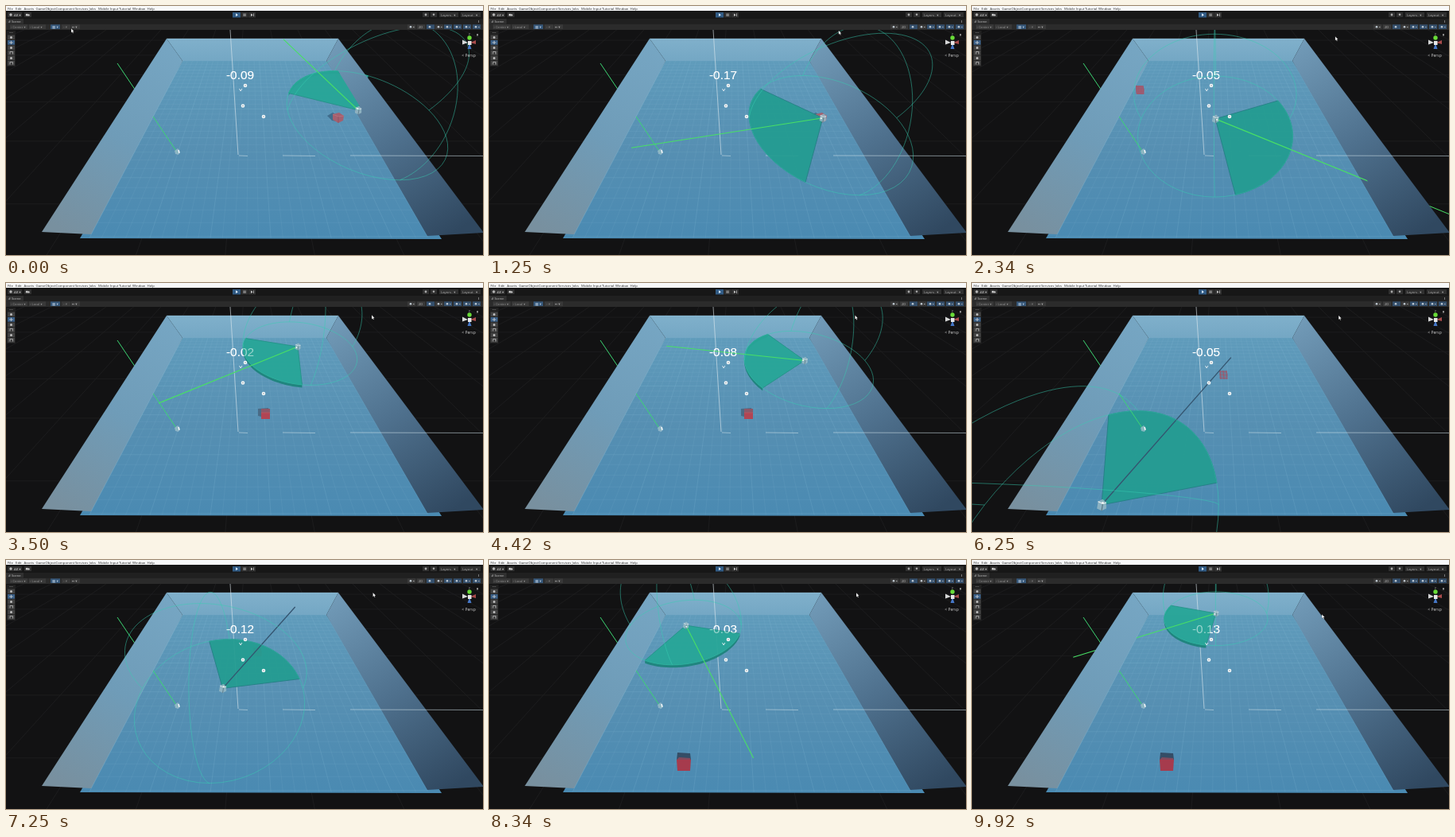
An HTML page with a canvas that plays this animation: 600 px wide and 313 px high, repeating every 10 s.

```html
<!DOCTYPE html>
<html lang="en">
<head>
<meta charset="utf-8">
<title>Scene view</title>
<style>
html, body { margin: 0; width: 100%; height: 100%; overflow: hidden; background: #111; }
canvas { display: block; width: 600px; height: 313px; }
</style>
</head>
<body>
<canvas id="stage" width="600" height="313"></canvas>
<script>
const ctx = document.getElementById('stage').getContext('2d');
const LOOP = 10000, STEP = 1000 / 12, DEG = Math.PI / 180;
const HALF_VIEW = 50 * DEG, RAY = 2.45;
const SANS = '"Liberation Sans", Arial, sans-serif';
const UI = '"Open Sans", "Noto Sans", sans-serif';

// Perspective: x across, z depth, y height; one unit is the sensing radius.
function project(x, z, y = 0) {
  const d = z - 1.4 * y;
  return d < 0.2 ? null : [308 + 318 * x / d, (808 - 546 * y) / d - 95];
}
function unproject(sx, sy) {
  const z = 808 / (sy + 95);
  return [(sx - 308) * z / 318, z];
}

// Each run: start time, cube on screen, keys [time, screen x, screen y, heading].
const runs = [
  { start: -1385, cube: [417, 140], look: 'hex',
    keys: [[0, 443, 131, 108], [700, 425, 142, 150], [1570, 417, 140, 215]] },
  { start: 1570, cube: [211, 105], look: 'mesh',
    keys: [[1570, 322, 128, 20], [2340, 306, 142, -29], [3190, 216, 108, -190]] },
  { start: 3190, cube: [326, 164], look: 'side',
    keys: [[3190, 362, 84, 228], [3500, 367, 80, 213], [5340, 434, 119, 126], [5480, 436, 122, 122]] },
  { start: 5480, cube: [316, 115], look: 'wire',
    keys: [[5480, 163, 279, 85], [6250, 163, 279, 60], [7880, 312, 119, 58]] },
  { start: 7880, cube: [245, 255], look: 'top',
    keys: [[7880, 215, 90, -40], [8340, 248, 82, -65], [9920, 307, 67, -149], [10000, 310, 67, -153]] }
];
const cursorKeys = [[0, 83, 30], [500, 180, 12], [1200, 440, 32], [2340, 458, 40],
  [3500, 461, 42], [8340, 463, 43], [9200, 460, 46], [9920, 441, 70], [10000, 440, 70]];

function sample(keys, t) {
  let i = 0;
  while (i < keys.length - 2 && t >= keys[i + 1][0]) i++;
  const a = keys[i], b = keys[i + 1];
  const k = Math.min(1, Math.max(0, (t - a[0]) / (b[0] - a[0])));
  return a.slice(1).map((v, j) => v + (b[j + 1] - v) * k);
}
for (const run of runs)
  run.path = run.keys.map(([t, x, y, h]) => [t, ...unproject(x, y), h * DEG]);

function trace(points, close) {
  ctx.beginPath();
  let pen = false;
  for (const p of points) {
    if (!p) { pen = false; continue; }
    pen ? ctx.lineTo(p[0], p[1]) : ctx.moveTo(p[0], p[1]);
    pen = true;
  }
  if (close) ctx.closePath();
}
function line(points, color, width = 1) {
  trace(points);
  ctx.strokeStyle = color;
  ctx.lineWidth = width;
  ctx.stroke();
}
function poly(points, fill) {
  trace(points, true);
  ctx.fillStyle = fill;
  ctx.fill();
}
function rect(x, y, w, h, fill) {
  ctx.fillStyle = fill;
  ctx.fillRect(x, y, w, h);
}
function disc(x, y, r, fill) {
  ctx.beginPath();
  ctx.arc(x, y, r, 0, 2 * Math.PI);
  ctx.fillStyle = fill;
  ctx.fill();
}
function text(s, x, y, size, fill, align = 'left', font = UI) {
  ctx.font = `${size}px ${font}`;
  ctx.textAlign = align;
  ctx.fillStyle = fill;
  ctx.fillText(s, x, y);
}
function gradient(x0, y0, x1, y1, ...colors) {
  const g = ctx.createLinearGradient(x0, y0, x1, y1);
  colors.forEach((c, i) => g.addColorStop(i / (colors.length - 1), c));
  return g;
}
function arc(from, to, place, steps = 64) {
  return Array.from({ length: steps + 1 }, (_, i) => {
    const a = from + (to - from) * i / steps;
    return place(Math.cos(a), Math.sin(a));
  });
}

function drawGround() {
  rect(0, 30, 600, 283, '#121213');
  for (let i = -9; i <= 9; i++)
    line([project(i * 0.7 - 0.2, 1.4), project(i * 0.7 - 0.2, 6.6)], '#222223', 0.7);
  for (let i = 0; i < 8; i++) {
    const y = 808 / (1.65 + i * 0.7) - 95;
    line([[0, y], [600, y]], '#202021', 0.7);
  }
}

function drawRoom() {
  poly([[222, 69], [403, 69], [548, 293], [93, 292]], gradient(0, 69, 0, 293, '#5f9bbb', '#568fb2', '#4a8ab2'));
  for (let i = 0; i <= 28; i++) {
    const x = -1.335 + i * 0.1;
    line([project(x, 4.92), project(x, 2.09)], i % 5 ? 'rgba(150,200,222,.13)' : 'rgba(150,200,222,.23)', 0.7);
  }
  for (let i = 0; i <= 28; i++) {
    const z = 2.1 + i * 0.1;
    line([project(-1.335, z), project(1.47, z)], i % 5 ? 'rgba(150,200,222,.13)' : 'rgba(150,200,222,.23)', 0.7);
  }
  poly([[202, 41], [418, 41], [403, 69], [222, 69]], gradient(0, 41, 0, 69, '#80b0cb', '#74a7c4'));
  poly([[202, 41], [222, 69], [107, 287], [45, 284]], gradient(210, 45, 75, 285, '#76a6c3', '#6f9cb8', '#78909f'));
  poly([[418, 41], [601, 285], [530, 289], [403, 69]], gradient(410, 50, 560, 287, '#719ab7', '#4f718e', '#304860'));
  line([[202, 41], [418, 41]], 'rgba(160,205,225,.5)', 0.6);
  line([[222, 69], [107, 287]], 'rgba(155,195,215,.35)', 0.6);
}

function drawAxes() {
  line([[282, 30], [292, 187]], 'rgba(225,235,240,.75)', 0.8);
  for (const [a, b] of [[293, 304], [348, 389], [433, 600]])
    line([[a, 188], [b, 188.5]], 'rgba(205,222,230,.7)', 0.8);
}

function drawCube([x, y], look) {
  ctx.save();
  ctx.translate(x, y);
  if (look === 'hex') {
    poly([[-13, -2], [-6, -6], [1, -2], [0, 5], [-7, 4]], 'rgba(55,95,125,.75)');
    poly([[-6, -4], [2, -6], [8, -2], [7, 4], [1, 7], [-6, 3]], '#a4606f');
    line([[-6, -4], [1, -1], [8, -2]], '#bd7480', 0.7);
    line([[1, -1], [1, 7]], '#8c4e60', 0.7);
  } else if (look === 'mesh' || look === 'wire') {
    const fill = look === 'mesh' ? '#8c7088' : '#687e99';
    poly([[-5, -5], [4, -5], [6, 0], [5, 6], [-4, 6], [-5, 1]], fill);
    for (let i = -4; i <= 4; i += look === 'mesh' ? 2 : 4) {
      line([[i, -5], [i + 1, 6]], '#a94f62', 0.8);
      line([[-5, i], [5, i + 1]], '#a94f62', 0.6);
    }
  } else if (look === 'side') {
    poly([[-9, -6], [4, -7], [5, -3], [-5, 4], [-9, 3]], '#496b86');
    rect(-5, -6, 11, 6, '#8d5667');
    rect(-5, -1, 11, 8, '#b14554');
    line([[-5, -1], [6, -1]], '#c35b66', 0.6);
  } else {
    poly([[-8, -13], [8, -12], [9, -4], [-9, -4]], '#344d66');
    poly([[-9, -4], [-6, -7], [8, -6], [9, -3]], '#81495c');
    poly([[-9, -4], [9, -4], [8, 10], [-8, 10]], '#a63b4d');
  }
  ctx.restore();
}

function drawWedge(x, z, h) {
  const rim = arc(h - HALF_VIEW, h + HALF_VIEW, (c, s) => project(x + c, z + s), 40);
  const shape = [project(x, z), ...rim];
  const raised = z > 3.5;
  if (raised) {
    const low = rim.map(([a, b]) => [a, b + 3.5]);
    poly([...rim, ...low.reverse()], '#20857f');
  }
  poly(shape, raised ? 'rgba(39,166,151,.94)' : 'rgba(35,157,145,.93)');
  trace(shape, true);
  ctx.strokeStyle = raised ? '#219184' : '#227d82';
  ctx.lineWidth = 0.8;
  ctx.stroke();
}

function drawRay(x, z, h, aimed) {
  const ray = [project(x, z), project(x + RAY * Math.cos(h), z + RAY * Math.sin(h))];
  line(ray, aimed ? '#34546f' : '#48df65', aimed ? 1.3 : 1.1);
}

function drawSphere(x, z) {
  const color = 'rgba(55,207,177,.62)';
  const shapes = [
    arc(0, 2 * Math.PI, (c, s) => project(x + c, z + s)),
    arc(0, Math.PI, (c, s) => project(x + c, z, s)),
    arc(0, Math.PI, (c, s) => project(x, z + c, s))
  ];
  for (const s of shapes) line(s, color, 0.8);
}

function drawAgent(x, z, h) {
  const [sx, sy] = project(x, z), k = 2.3 / z + 0.4;
  ctx.save();
  ctx.translate(sx, sy);
  ctx.scale(k, k);
  poly([[-3, -3], [1, -5], [4, -2], [4, 3], [0, 5], [-4, 3]], 'rgba(150,185,198,.85)');
  line([[-3, -3], [1, -1], [4, -2]], '#dbe6ea', 0.8);
  line([[1, -1], [0, 5]], '#587784', 0.8);
  disc(2 * Math.cos(h), -2 * Math.sin(h), 1, '#edf4f4');
  ctx.restore();
}

function drawFixedRay() {
  line([[140, 72], [216, 185]], '#3cd572', 1);
}

function drawMarkers() {
  for (const [x, y] of [[301, 100], [298, 125.5], [324, 139]]) {
    disc(x, y, 2.3, '#f5f8f9');
    disc(x, y, 0.8, '#8d9ca5');
  }
  line([[293.5, 104], [295.2, 107], [296.8, 104]], '#e8f0f4', 0.9);
  poly([[212, 182], [216, 179], [219, 183], [217, 187], [213, 186]], 'rgba(155,188,202,.8)');
  line([[217, 181], [218, 185]], '#fff', 1.3);
}

function drawScore(value, alpha) {
  text(value, 294.5, 92, 15.4, `rgba(255,255,255,${alpha})`, 'center', SANS);
}

function drawCompass() {
  poly([[581, 46], [574, 42.5], [574, 48.5]], '#d5d6d6');
  poly([[584, 46], [591, 43], [591, 48]], '#a94b4b');
  poly([[583, 47], [580.5, 54], [585.5, 54]], '#4678c8');
  rect(581, 44, 4.5, 5, '#e6e7e7');
  disc(583, 40, 2.7, '#69dc38');
  text('y', 583, 36, 3.5, '#bbb', 'center');
  text('< Persp', 582, 64, 5, '#c9c9c9', 'center');
  rect(592, 35, 2, 2.5, '#898989');
}

function drawTools() {
  rect(1, 31, 11, 45, '#202020');
  for (let i = 0; i < 6; i++) {
    const y = 36.5 + i * 6.5;
    rect(2, y, 9, 5.7, i === 1 ? '#3a5f86' : '#424242');
    if (i === 1) {
      line([[4, y + 3], [9, y + 3]], '#ddd', 0.7);
      line([[6.5, y + 0.8], [6.5, y + 5]], '#ddd', 0.7);
    } else if (i % 2) {
      line([[5, y + 4.5], [5, y + 1.5], [8.5, y + 1.5], [8.5, y + 4.5]], '#c4c4c4', 0.7);
    } else disc(6.5, y + 3, 1.5, '#bdbdbd');
  }
  line([[4, 33.5], [9, 33.5]], '#555', 0.8);
}

function drawChrome() {
  rect(0, 0, 600, 6, '#f8f9fa');
  const menu = [['File', 2], ['Edit', 12], ['Assets', 22.5], ['GameObject', 37.5], ['Component', 62.5],
    ['Services', 87], ['Jobs', 104.5], ['Mobile Input', 116], ['Tutorial', 142], ['Window', 159], ['Help', 177.5]];
  for (const [s, x] of menu) text(s, x, 4.7, 4.3, '#222');

  rect(0, 6, 600, 10, '#171717');
  rect(2, 8, 18, 6, '#303030');
  disc(6, 11, 1.7, '#bbb');
  text('AB ▾', 10, 12.8, 4.3, '#c5c5c5');
  rect(23, 8, 9, 6, '#303030');
  disc(26.3, 11.2, 1.4, '#ccc');
  disc(28.5, 11.4, 1.2, '#ccc');
  rect(285, 8, 10, 6.5, '#315b84');
  rect(295.5, 8, 9, 6.5, '#303030');
  rect(305, 8, 9, 6.5, '#303030');
  poly([[289, 9.3], [292, 11.2], [289, 13]], '#dcecff');
  rect(298.7, 9.5, 0.9, 3.4, '#ccc');
  rect(300.6, 9.5, 0.9, 3.4, '#ccc');
  poly([[308, 9.5], [310.5, 11.2], [308, 13]], '#ccc');
  rect(311, 9.5, 0.7, 3.4, '#ccc');
  rect(524, 8, 8, 6, '#303030');
  rect(534, 8, 8, 6, '#303030');
  disc(528, 11, 1.4, '#aaa');
  disc(538, 10.8, 1.3, '#aaa');
  rect(545, 8, 24, 6, '#303030');
  rect(572, 8, 25, 6, '#303030');
  text('Layers   ▾', 547, 12.8, 4.3, '#aaa');
  text('Layout   ▾', 574, 12.8, 4.3, '#aaa');

  rect(0, 16, 600, 6.5, '#202020');
  rect(0, 16, 22, 6.5, '#303030');
  text('# Scene', 3, 20.8, 4.3, '#c0c0c0');
  rect(594, 18, 1, 3, '#777');

  rect(0, 22.5, 600, 7.5, '#2b2b2b');
  rect(5, 23.3, 22, 5.7, '#393939');
  rect(29, 23.3, 21, 5.7, '#393939');
  text('▫ Center ▾', 6, 27.7, 4.1, '#929292');
  text('▫ Local ▾', 30, 27.7, 4.1, '#929292');
  rect(56, 23.3, 12, 5.7, '#355678');
  rect(70, 23.3, 11, 5.7, '#383838');
  rect(82, 23.3, 11, 5.7, '#383838');
  text('▦ ▾', 58, 27.8, 4.5, '#bccee0');
  text('▫ ▾', 72, 27.8, 4.5, '#777');
  text('▪▪ ▾', 83, 27.8, 4.5, '#aaa');
  [505, 517, 529, 540, 551, 563, 575, 587].forEach((x, i) => {
    rect(x, 23.3, 10, 5.7, i === 2 || i > 3 ? '#344f6c' : '#3a3a3a');
    if (i === 1) text('2D', x + 2, 27.7, 4, '#bbb');
    else disc(x + 4, 26.2, 1.3, '#c1cbd3');
    if (i !== 1 && i !== 2) rect(x + 7, 26, 1.6, 0.8, '#bbb');
  });
}

function drawCursor(x, y) {
  const shape = [[0, -2], [0, 4], [1.4, 2.9], [2.4, 5], [3.4, 4.5], [2.4, 2.5], [4.2, 2.4]];
  const at = shape.map(([a, b]) => [x - 1 + a * 0.85, y + b * 0.85]);
  poly(at, '#fff');
  trace(at, true);
  ctx.strokeStyle = 'rgba(0,0,0,.6)';
  ctx.lineWidth = 0.3;
  ctx.stroke();
}

// Limits drawing to the part of the floor between the side walls.
function insideWalls(draw) {
  ctx.save();
  trace([[206, 30], [388, 30], [410, 69], [448, 131], [542, 300], [95, 310], [222, 69]], true);
  ctx.clip();
  draw();
  ctx.restore();
}

function render(time) {
  const t = Math.floor(time / STEP + 1e-6) * STEP;
  const run = runs.filter(r => r.start <= t).pop();
  const [x, z, h] = sample(run.path, t);
  const score = '-' + ((t - run.start) * 0.000065).toFixed(2);
  const sensors = () => {
    drawWedge(x, z, h);
    drawRay(x, z, h, run.look === 'wire');
    drawFixedRay();
  };

  ctx.clearRect(0, 0, 600, 313);
  ctx.save();
  ctx.beginPath();
  ctx.rect(0, 30, 600, 283);
  ctx.clip();
  drawGround();
  sensors();
  drawRoom();
  drawAxes();
  drawCube(run.cube, run.look);
  drawScore(score, 1);
  insideWalls(sensors);
  drawScore(score, 0.5);
  drawSphere(x, z);
  drawAgent(x, z, h);
  drawMarkers();
  drawCompass();
  drawTools();
  ctx.restore();
  drawChrome();
  drawCursor(...sample(cursorKeys, t));
}

const origin = performance.now();
function tick() {
  render((performance.now() - origin) % LOOP);
  requestAnimationFrame(tick);
}
tick();
</script>
</body>
</html>
```
